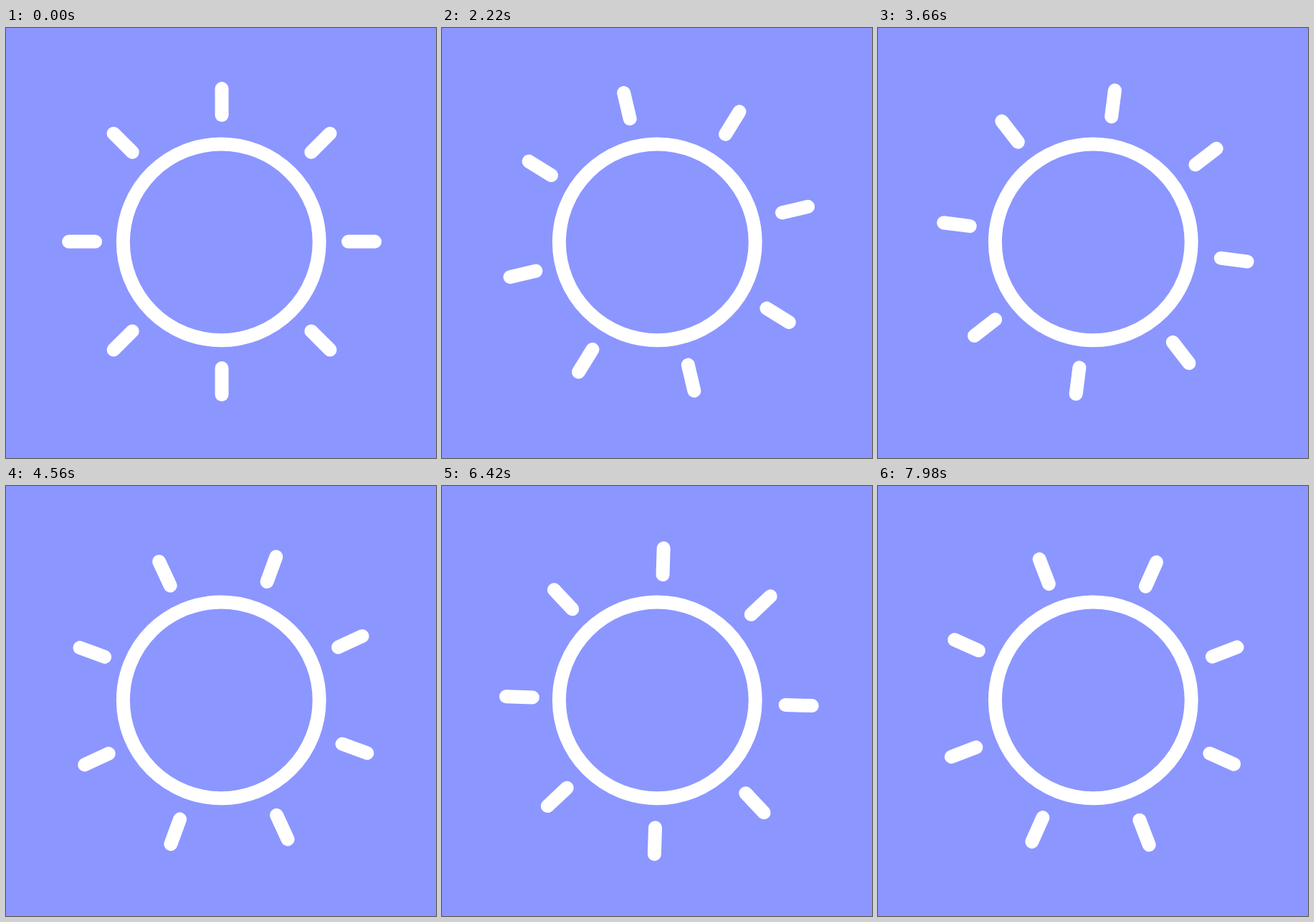
An HTML page for the animation above (8000 ms loop, 600 by 600 pixels).

```html
<!DOCTYPE html>
<html lang="en">
<head>
<meta charset="utf-8">
<title>Sun</title>
<style>
  html, body { margin: 0; width: 100%; height: 100%; overflow: hidden; background: #8c96ff; }
  svg { display: block; width: 100vw; height: 100vh; }
</style>
</head>
<body>
<svg viewBox="0 0 600 600" fill="none" stroke="#fff" stroke-width="19" stroke-linecap="round">
  <circle cx="300.3" cy="298.8" r="136.9"/>
  <g id="rays"></g>
</svg>
<script>
  const LOOP = 8000, STEP = 30, MS_PER_DEGREE = 70, RAY_COUNT = 8;
  const rays = document.getElementById('rays');

  for (let i = 0; i < RAY_COUNT; i++) {
    const ray = document.createElementNS('http://www.w3.org/2000/svg', 'path');
    ray.setAttribute('d', 'M0-176.5V-213.5');
    ray.setAttribute('transform', `rotate(${i * 360 / RAY_COUNT})`);
    rays.append(ray);
  }

  const start = performance.now();

  function draw() {
    const elapsed = (performance.now() - start) % LOOP;
    const t = Math.floor(elapsed / STEP) * STEP;
    const k = t / LOOP;
    // The wheel drifts along a shallow arc while it turns.
    const x = 301.1 + 2.3 * Math.sin(2.9 * k);
    const y = 298.1 + 3.3 * k * k;
    rays.setAttribute('transform', `translate(${x} ${y}) rotate(${t / MS_PER_DEGREE})`);
    requestAnimationFrame(draw);
  }
  draw();
</script>
</body>
</html>
```
